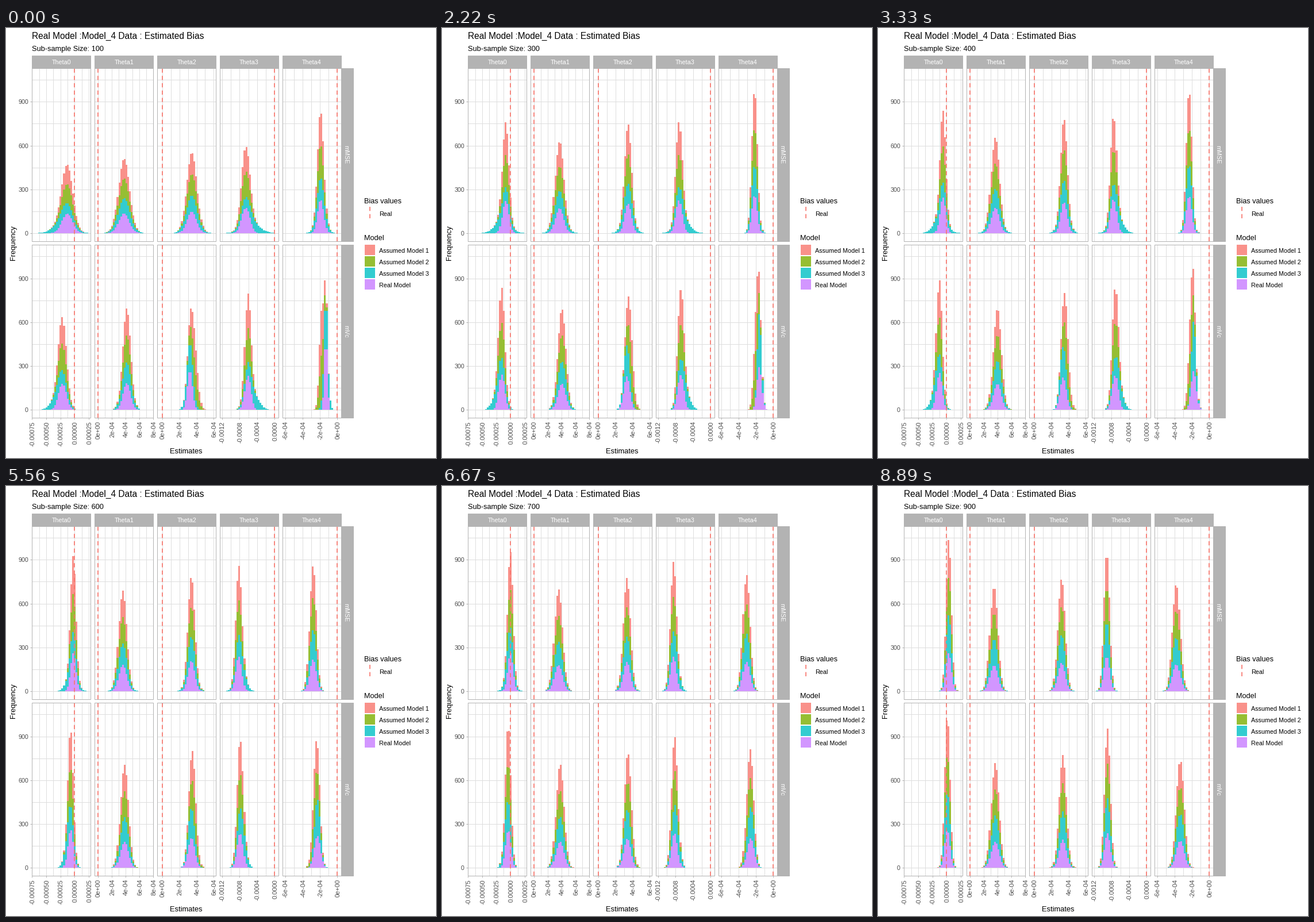
Recreate the animation shown at these times as a matplotlib script. Size 748 by 748 pixels, loop 10 s.

```python
import math
from collections import namedtuple

import matplotlib.pyplot as plt
import numpy as np
from matplotlib.animation import FuncAnimation
from matplotlib.patches import Rectangle

SIZE, DPI, LOOP, FRAMES = 748, 68, 10000, 100
PT = 72 / DPI
BAR, BINS, DRAWS = 3.09, 30, 1000
GREY, GRID, INK, HUE = "#B3B3B3", "#DEDEDE", "#4D4D4D", "#F8766D"
FILL = ["#D296FF", "#33CCD0", "#96BE33", "#F9918A"]
MODELS = ["Real Model", "Assumed Model 3", "Assumed Model 2", "Assumed Model 1"]
SIZES = range(100, 1000, 100)
LEFT, PANEL_W, PITCH = 45.5, 102, 108.85
UNIT = 76.25 / 300

# zero and step place the ticks in px; the rest shapes the bells, in bars:
# final width, arc of the drift, lean of model 3, gap between model pairs
Col = namedtuple("Col", "zero step value fmt width arc lean gap")
COLS = [
    Col(119.5, 24.7, 0.00025, "%.5f", 1.5, 0, -2, 0),
    Col(160, 24.05, 2e-4, "%.0e", 2.2, 0, 0, 0),
    Col(272, 29.8, 2e-4, "%.0e", 2.05, 0.6, 0, -1.2),
    Col(467.5, 30.55, 4e-4, "%.4f", 1.65, 0, 2.5, 0),
    Col(576.5, 30.2, 2e-4, "%.0e", 2.15, 1.5, 0, 1.2),
]

# centres drift from start to end, one value per column
Row = namedtuple("Row", "name base width split start end")
ROWS = [
    Row("mMSE", 357, 3, 0, (-4.2, 14.7, 16.6, -16.3, -9.4),
        (1.2, 13.5, 15.3, -22.5, -18.6)),
    Row("mVc", 664.3, 2.2, 1, (-6.9, 16.2, 16.7, -15.1, -7.7),
        (0.4, 14.2, 16, -22.1, -16.4)),
]

plt.rcParams["font.family"] = "Liberation Sans"
fig = plt.figure(figsize=(SIZE / DPI, SIZE / DPI), dpi=DPI, facecolor="white")
ax = fig.add_axes([0, 0, 1, 1])
ax.axis("off")
erf = np.vectorize(math.erf)


def text(x, y, s, px=10.7, color="black", **kw):
    return ax.text(x, y, s, fontsize=px * PT, color=color, **kw)


def line(x, y, color=GRID, width=1, z=1, **kw):
    ax.plot(x, y, color=color, lw=width * PT, zorder=z,
            solid_capstyle="butt", dash_capstyle="butt", **kw)


def box(x0, y0, x1, y1, face, edge="none", z=1):
    ax.add_patch(Rectangle((x0, y0), x1 - x0, y1 - y0, facecolor=face,
                           edgecolor=edge, lw=PT, zorder=z))


def dashed(x, y0, y1):
    line([x, x], [y1, y0], HUE, 1.7, 5, dashes=(4.3, 3.2))


def left(c):
    return LEFT + PITCH * c


def span(row):
    return row.base - 287.5, row.base + 13.6


def ticks(c, step):
    """Multiples of step around zero that fall inside column c."""
    for k in range(-8, 9):
        x = COLS[c].zero + k * step
        if -1 < x - left(c) < PANEL_W + 1:
            yield k, x


def bell(c, row, model, t):
    """Mean and width of one model's bell, in bars from zero."""
    col, gap = COLS[c], COLS[c].gap * row.split
    wide, pair, ease = 1, -1, 6
    mean = row.start[c] + (row.end[c] - row.start[c]) * t
    if model == 1:
        wide, ease = 1.3 + abs(col.lean) / 5, 1.2
        mean += col.lean * (1 - t)
    if model < 2:
        wide, pair = wide - abs(gap) / 5, 1
    mean += pair * gap * (1 - t) + col.arc * 4 * t * (1 - t)
    width = col.width + (row.width * wide - 0.08 * row.width / 3 * c * c
                         - col.width) * (1 - t) ** ease
    return mean, width - col.arc * 2.7 * t * (1 - t) ** 2


def stacks(c, row, edges, t):
    """Running totals of the four models, bottom first."""
    total = np.zeros(BINS)
    for model in range(len(MODELS)):
        mean, width = bell(c, row, model, t)
        cdf = erf((edges - mean) / (width * math.sqrt(2))) / 2
        total = total + np.round(DRAWS * np.diff(cdf))
        yield total


def draw_panel(c, row):
    x0, x1 = left(c), left(c) + PANEL_W
    top, bottom = span(row)
    for k in range(8):
        y = row.base - 150 * k * UNIT
        line([x0, x1], [y, y])
    for _, x in ticks(c, COLS[c].step / 2):
        line([x, x], [top, bottom])
    dashed(COLS[c].zero, top, bottom)
    box(x0, top, x1, bottom, "none", GREY, 6)


def draw_bars(c, row):
    zero = COLS[c].zero
    first = int((left(c) + PANEL_W / 22 - zero) / BAR)
    edges = first - 0.5 + np.arange(BINS + 1)
    flat = np.full(BINS, row.base)
    layers = [ax.stairs(flat, zero + BAR * edges, baseline=row.base, fill=True,
                        color=color, lw=0, zorder=4 - i / 4)
              for i, color in enumerate(FILL)]
    return c, row, edges, layers


def draw_frame():
    for c, col in enumerate(COLS):
        x0 = left(c)
        box(x0, 47.5, x0 + PANEL_W, 69.5, GREY, GREY)
        text(x0 + PANEL_W / 2, 63, f"Theta{c}", color="white", ha="center")
        for k, x in ticks(c, col.step):
            line([x, x], [678, 681], GREY)
            text(x + 1, 684, col.fmt % (k * col.value), 11.2, INK, rotation=90,
                 ha="center", va="top")
    for row in ROWS:
        top, bottom = span(row)
        box(583, top, 604, bottom, GREY, GREY)
        text(591.5, (top + bottom) / 2, row.name, color="white", rotation=-90,
             ha="center", va="center")
        for v in range(0, 901, 300):
            y = row.base - v * UNIT
            line([42, 45], [y, y], GREY)
            text(39, y + 4, str(v), color=INK, ha="right")


def draw_legend():
    text(623, 305, "Bias values", 12.7)
    dashed(633, 311, 331)
    text(649, 326.5, "Real")
    text(623, 369, "Model", 12.7)
    for i, (name, color) in enumerate(zip(MODELS[::-1], FILL[::-1])):
        y = 386 + 20 * i
        box(624, y - 9, 642, y + 9, color)
        text(649, y + 4.5, name)


text(45, 19, "Real Model :Model_4 Data : Estimated Bias", 15.5)
subtitle = text(45, 40, "", 12.8)
text(313.5, 740, "Estimates", 12.9, ha="center")
text(13, 374, "Frequency", 12.9, rotation=90, ha="center", va="center")
draw_frame()
draw_legend()
hists = []
for row in ROWS:
    for c in range(len(COLS)):
        draw_panel(c, row)
        hists.append(draw_bars(c, row))
ax.set(xlim=(0, SIZE), ylim=(SIZE, 0))


def update(frame):
    # round up so that no step comes late
    i = (frame * len(SIZES) + len(SIZES) - 1) // FRAMES
    t = i / (len(SIZES) - 1)
    subtitle.set_text(f"Sub-sample Size: {SIZES[i]}")
    for c, row, edges, layers in hists:
        for layer, total in zip(layers, stacks(c, row, edges, t)):
            layer.set_data(values=row.base - total * UNIT)


anim = FuncAnimation(fig, update, frames=FRAMES, interval=LOOP // FRAMES,
                     repeat=True, repeat_delay=0)
plt.show()
```
